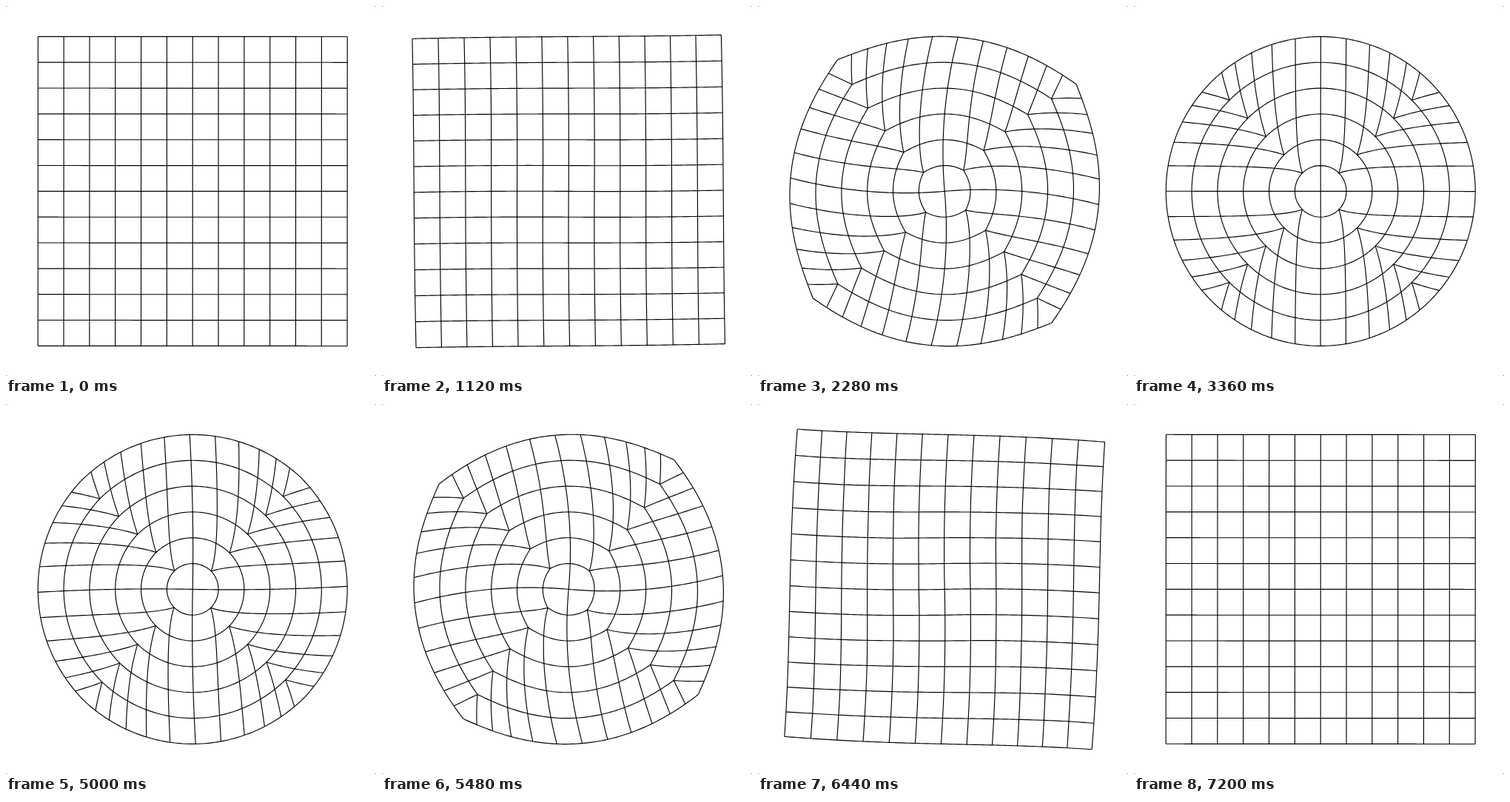
Recreate the animation shown at these times as an HTML page with a canvas. Size 500 px wide and 500 px high, loop 7.24 s.

```html
<!DOCTYPE html>
<html lang="en">
<head>
<meta charset="utf-8">
<title>Square to disc</title>
<style>
  html, body { margin: 0; width: 100%; height: 100%; overflow: hidden; background: #fff; }
  canvas { display: block; width: 500px; height: 500px; }
</style>
</head>
<body>
<canvas id="stage" width="500" height="500"></canvas>
<script>
const ctx = document.getElementById('stage').getContext('2d');
const LOOP = 7240, STEP = 40;
const CX = 252.2, CY = 250.4, R = 209;
const CELLS = 12, SUB = 8;
const TO_DISC = 2065, TO_SQUARE = 5740;   // midpoints of the two morphs
const TWIST = 38.7 * Math.PI / 180;

// Soft S-curve, x in seconds from the midpoint
const ease = x => 1 / (1 + Math.exp(-(5.5 * x + 0.4 * x ** 3)));

function stateAt(t) {
  if (t < 280) t += LOOP;
  const back = t > 3900;
  const p = ease((t - (back ? TO_SQUARE : TO_DISC)) / 1000);
  return {
    round: back ? 1 - p : p,
    twist: TWIST * Math.pow(p * (1 - p), 0.83) * (2 * p - 1)
  };
}

// x and y run from -1 to 1
function place(x, y, { round, twist }) {
  const len = Math.hypot(x, y);
  const max = Math.max(Math.abs(x), Math.abs(y));
  const r = len + (max - len) * round;
  const a = Math.atan2(y, x) + twist * (2 * r - 1);
  return [CX + R * r * Math.cos(a), CY + R * r * Math.sin(a)];
}

function draw(t) {
  const state = stateAt(t);
  const n = CELLS * SUB;
  ctx.fillStyle = '#fff';
  ctx.fillRect(0, 0, 500, 500);
  ctx.strokeStyle = '#000';
  ctx.lineWidth = 1.15;
  for (let i = 0; i <= CELLS; i++) {
    const fixed = 2 * i / CELLS - 1;
    for (const upright of [true, false]) {
      ctx.beginPath();
      for (let j = 0; j <= n; j++) {
        const along = 2 * j / n - 1;
        ctx.lineTo(...(upright ? place(fixed, along, state) : place(along, fixed, state)));
      }
      ctx.stroke();
    }
  }
  // Dark specks in the stage corners
  ctx.fillStyle = '#666';
  for (const x of [0, 499]) for (const y of [0, 499]) ctx.fillRect(x, y, 1, 1);
}

function tick() {
  const t = performance.now() % LOOP;
  draw(Math.floor(t / STEP) * STEP);
  requestAnimationFrame(tick);
}
tick();
</script>
</body>
</html>
```
